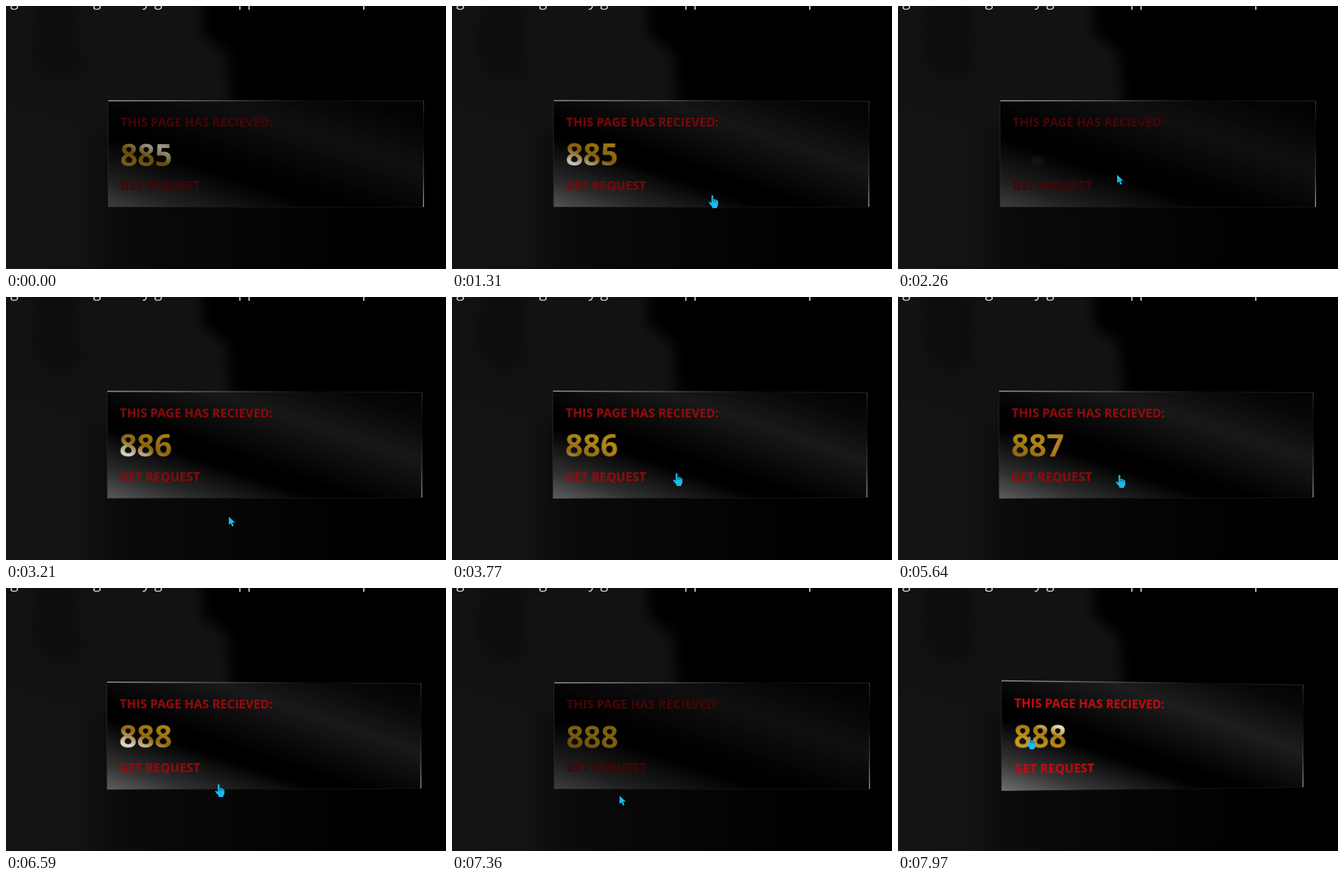
Animation, 701 px wide and 419 px high, one loop 8000 ms. Source, as an HTML page:

```html
<!DOCTYPE html>
<html lang="en">
<head>
<meta charset="utf-8">
<title>Request counter</title>
<style>
html, body { margin: 0; width: 100%; height: 100%; overflow: hidden; background: #000; }
svg { position: absolute; display: block; font-family: "Open Sans", "Noto Sans", sans-serif; }
#page, #pointer { left: 0; top: 0; width: 701px; height: 419px; }
#card, #back { position: absolute; left: 163px; top: 151px; width: 503px; height: 169px; }
#card { overflow: visible; font-weight: 700; }
#back { background: linear-gradient(to top right, #707070 0, #383838 13%, #000 33%, #000 40%, #1d1d1d 67%, #080808 88%, #030303); }
</style>
</head>
<body>
<svg id="page" viewBox="0 0 701 419">
  <defs>
    <filter id="soft" x="-20%" y="-20%" width="140%" height="140%" color-interpolation-filters="sRGB">
      <feGaussianBlur stdDeviation="10"/>
    </filter>
    <linearGradient id="floor" gradientUnits="userSpaceOnUse" x1="0" x2="540">
      <stop offset="0" stop-color="#141414"/><stop offset=".22" stop-color="#131313"/>
      <stop offset=".32" stop-color="#0b0b0b"/><stop offset=".7" stop-color="#050505"/><stop offset="1" stop-color="#010101"/>
    </linearGradient>
  </defs>
  <rect width="701" height="419"/>
  <g filter="url(#soft)">
    <path d="M-60 140H340L530 330 520 480H-60Z" fill="url(#floor)"/>
    <path d="M-60-60H312V45L352 75 358 155 340 190 160 200-60 150Z" fill="#121212"/>
    <path d="M50-60H110L120 110 70 120 40 80Z" fill="#0d0d0d"/>
  </g>
  <text x="652" y="0" font-size="24.2" text-anchor="end" fill="#d8d8d8">language technologies. My goal is to support others and provide</text>
</svg>
<div id="back"></div>
<svg id="card" viewBox="163 151 503 169">
  <defs>
    <linearGradient id="top">
      <stop offset="0" stop-color="#85857a"/><stop offset=".2" stop-color="#6c6c64"/>
      <stop offset=".5" stop-color="#242424"/><stop offset=".66" stop-color="#080808"/><stop offset="1" stop-color="#282828"/>
    </linearGradient>
    <linearGradient id="side" x2="0" y2="1">
      <stop offset="0" stop-color="#444"/><stop offset=".35" stop-color="#0c0c0c"/>
      <stop offset=".7" stop-color="#3c3c3c"/><stop offset="1" stop-color="#999"/>
    </linearGradient>
    <linearGradient id="gold" gradientUnits="userSpaceOnUse">
      <stop offset="0" stop-color="#cb9a1c"/><stop offset=".28" stop-color="#a8770f"/>
      <stop offset=".42" stop-color="#e0cfa0"/><stop offset=".5" stop-color="#fffdf2"/>
      <stop offset=".58" stop-color="#e0cfa0"/><stop offset=".72" stop-color="#a8770f"/><stop offset="1" stop-color="#cb9a1c"/>
    </linearGradient>
    <radialGradient id="glow"><stop stop-color="#1a1612"/><stop offset="1" stop-color="#1a1612" stop-opacity="0"/></radialGradient>
  </defs>
  <path d="M163 150H420L666 151V152H420L163 152Z" fill="url(#top)"/>
  <path d="M664.8 151H666L665 209 666 240V320H664.4V240L664.8 209Z" fill="url(#side)"/>
  <path d="M162.5 151V320" stroke="#242424"/>
  <path d="M163 320.5H666" stroke="#141414"/>
  <g id="labels" fill="#c30b10" font-size="19.36">
    <text x="182.5" y="192">THIS PAGE HAS RECIEVED:</text>
    <text x="182" y="293">GET REQUEST</text>
  </g>
  <ellipse id="trace" cx="222" cy="247" rx="16" ry="12" fill="url(#glow)"/>
  <text id="count" x="182" y="254.5" font-size="48.4" fill="url(#gold)"></text>
</svg>
<svg id="pointer" viewBox="0 0 701 419">
  <g id="cursor" fill="#1eb8f0">
    <path id="arrow" d="M0 0V13L3 10.5 5.4 15.6 7.8 14.6 5.6 9.6H10Z"/>
    <g id="hand" transform="translate(-6 0)">
      <path d="M4.4 1.6Q5.8-.4 7.2 1.6V7Q9 6 10 7.6 12 6.8 12.8 8.4 15 8.2 15 10.4V15Q15 18 13 19.4V21H5.6V19Q3 16 .4 12.8 0 10.6 2 11L4.4 13Z"/>
      <path d="M7.4 7V11M10 8V11.4M12.7 9V11.6" fill="none" stroke="#063850" stroke-width=".8"/>
    </g>
  </g>
</svg>
<script>
const $ = id => document.getElementById(id);
const clamp = v => Math.min(1, Math.max(0, v));
const LOOP = 8000, FADE = 480, LAG = 110;
const ENTRY = 150, EDGE = 321;

// When the pointer crosses the card's lower edge: in, out, in, out...
const crossings = [1110, 2890, 3460, 4690, 5340, 6660, 7450, 8490];

// Page loads: start, number visible, hover active again
const loads = [
  { start: -2400, shown: -2400, ready: 0, value: 885 },
  { start: 2260, shown: 2520, ready: 2520, value: 886 },
  { start: 4200, shown: 4270, ready: 4270, value: 887 },
  { start: 5860, shown: 5930, ready: 6280, value: 888 }
];

// Horizontal drift of the pointer: [time, x]
const drift = [[ENTRY, 640], [1310, 415], [2000, 347], [4800, 365], [6590, 339], [LOOP, 207]];

function pointerX(t) {
  const i = Math.max(1, drift.findIndex(k => k[0] > t));
  const [t0, x0] = drift[i - 1], [t1, x1] = drift[i];
  return x0 + (x1 - x0) * clamp((t - t0) / (t1 - t0));
}

// The pointer swings above and below the edge between crossings
function pointerY(t) {
  const i = crossings.findIndex(c => c > t);
  if (i < 1) return EDGE + 98 * (1 - clamp((t - ENTRY) / (crossings[0] - ENTRY)));
  const from = crossings[i - 1], to = crossings[i];
  const last = i === crossings.length - 1;
  const reach = i % 2 === 0 ? 30 : last ? -85 : -58;
  return EDGE + reach * Math.sin(Math.PI * (t - from) / (to - from));
}

// Fade in during each visit, fade out after it; a page load starts over
function hoverAt(t, ready) {
  let q = 0;
  for (let i = 0; i < crossings.length; i += 2) {
    const from = Math.max(crossings[i], ready), to = crossings[i + 1] + LAG;
    if (to < from || t < from) continue;
    q = clamp(q + (Math.min(t, to) - from) / FADE);
    if (t > to) q = clamp(q - (t - to) / FADE);
  }
  return q;
}

// A slanted highlight travels down through the digits
function shine(age) {
  const v = -15 + .033 * ((age + 960) % 3000), nx = -.35, ny = .94, r = 50;
  const cx = 224 + nx * v, cy = 220 + ny * v;
  const ends = { x1: cx - nx * r, y1: cy - ny * r, x2: cx + nx * r, y2: cy + ny * r };
  for (const k in ends) $("gold").setAttribute(k, ends[k]);
}

const show = (id, on) => $(id).style.display = on ? "" : "none";
const dim = (id, low, q) => $(id).style.filter = `brightness(${low + (1 - low) * q})`;

function draw(t) {
  const page = loads.filter(l => l.start <= t).pop();
  const loading = t < page.shown;
  const q = hoverAt(t, page.ready);

  $("back").style.transform = $("card").style.transform =
    `perspective(2000px) rotateY(${17.3 * q ** 2.6}deg)`;
  dim("back", .55, q);
  dim("labels", .36, q);
  dim("count", .62, q);

  $("count").textContent = loading ? "" : page.value;
  show("trace", loading);
  shine(Math.max(0, t - page.shown));

  const x = Math.round(pointerX(t)), y = Math.round(pointerY(t));
  const over = y < EDGE && !loading;
  $("cursor").setAttribute("transform", `translate(${x} ${y})`);
  show("cursor", t >= ENTRY);
  show("hand", over);
  show("arrow", !over);
}

const start = performance.now();
(function tick() {
  draw((performance.now() - start) % LOOP);
  requestAnimationFrame(tick);
})();
</script>
</body>
</html>
```
